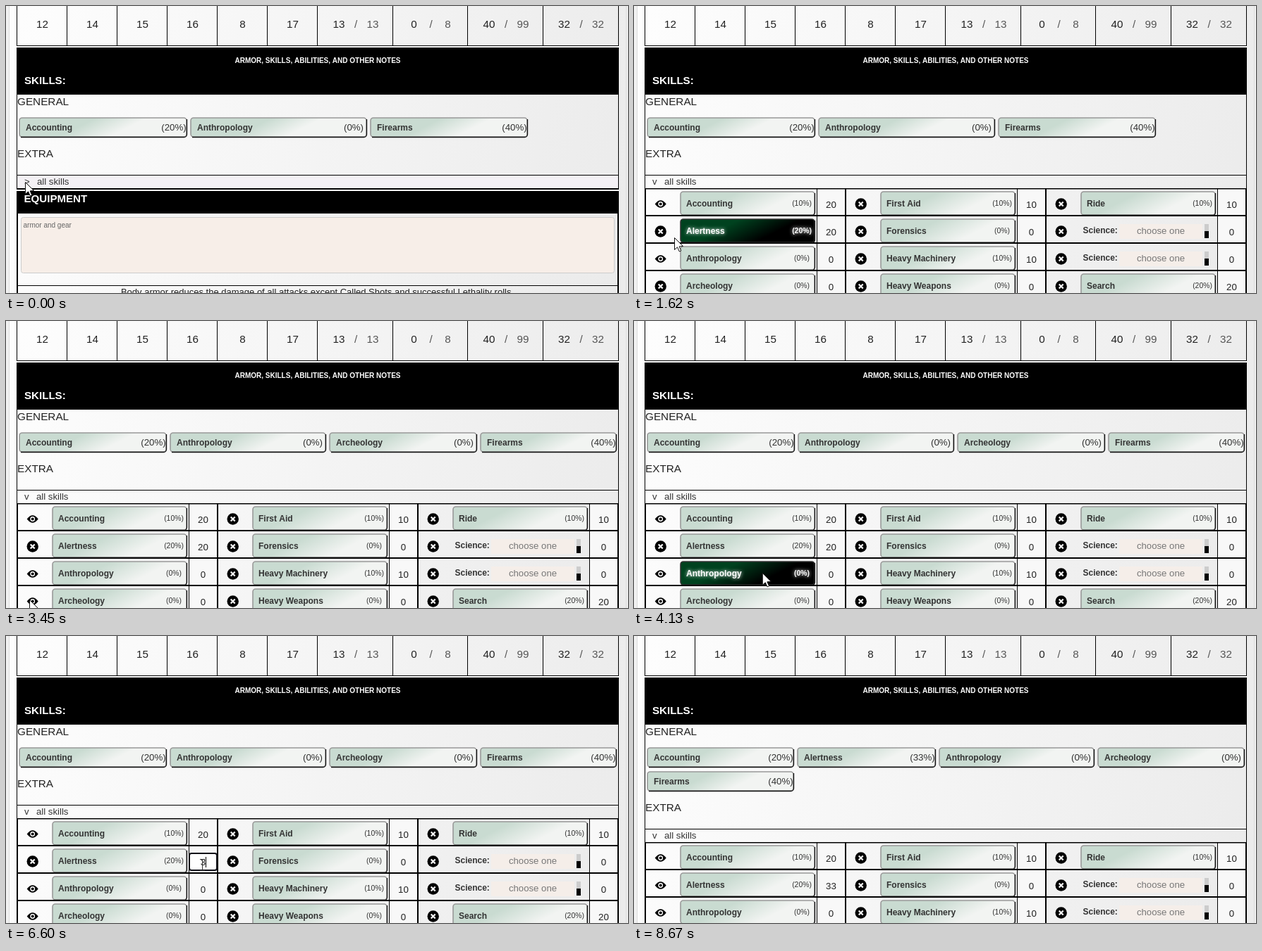
An HTML page with a canvas that plays this animation: 882x408 px, repeating every 9670 ms.

```html
<!DOCTYPE html>
<html lang="en">
<head>
<meta charset="utf-8">
<title>Skill sheet</title>
<style>
html, body { margin: 0; width: 100%; height: 100%; overflow: hidden; background: #f4f4f4; }
canvas { display: block; }
</style>
</head>
<body>
<canvas id="stage" width="882" height="408"></canvas>
<script>
const ctx = document.getElementById('stage').getContext('2d');
const W = 882, H = 408, LOOP = 9670, TICK = 200 / 3;
const FONT = '"Liberation Sans", Arial, sans-serif';

// name, base percent, current score; a null name is a "Science" chooser
const COLUMNS = [
  [['Accounting', 10, 20], ['Alertness', 20, 20], ['Anthropology', 0, 0], ['Archeology', 0, 0]],
  [['First Aid', 10, 10], ['Forensics', 0, 0], ['Heavy Machinery', 10, 10], ['Heavy Weapons', 0, 0]],
  [['Ride', 10, 10], [null, 0, 0], [null, 0, 0], ['Search', 20, 20]]
];

// name, percent, left, right, line
const PINNED = [
  [['Accounting', 20, 18, 257, 0], ['Anthropology', 0, 261, 512, 0], ['Firearms', 40, 516, 740, 0]],
  [['Accounting', 20, 18, 228, 0], ['Anthropology', 0, 232, 454, 0],
   ['Archeology', 0, 458, 668, 0], ['Firearms', 40, 672, 866, 0]],
  [['Accounting', 20, 18, 227, 0], ['Alertness', 33, 231, 428, 0], ['Anthropology', 0, 432, 653, 0],
   ['Archeology', 0, 657, 866, 0], ['Firearms', 40, 18, 227, 1]]
];

// time, x, y
const PATH = [
  [0, 27, 250], [1000, 27, 250], [1200, 46, 283], [1400, 78, 318], [1530, 70, 324],
  [1600, 57, 329], [1800, 41, 355], [1960, 33, 377], [2370, 33, 396], [3660, 33, 396],
  [3930, 110, 375], [4130, 215, 350], [4330, 278, 325], [8515, 278, 325], [8520, 553, 397]
];
// start, end, x, y
const CLICKS = [
  [270, 400, 27, 251], [2720, 2850, 33, 397], [4930, 5000, 276, 324], [5070, 5200, 276, 324]
];

const within = (t, a, b) => t >= a && t < b;

function rect(x, y, w, h, color = '#000') {
  ctx.fillStyle = color;
  ctx.fillRect(x, y, w, h);
}

function text(s, x, y, size, color = '#222', align = 'left', weight = 'normal') {
  ctx.font = `${weight} ${size}px ${FONT}`;
  ctx.fillStyle = color;
  ctx.textAlign = align;
  ctx.fillText(s, x, y);
}

function fade(x0, y0, x1, y1, from, to) {
  const g = ctx.createLinearGradient(x0, y0, x1, y1);
  g.addColorStop(0, from);
  g.addColorStop(1, to);
  return g;
}

function roundBox(x, y, w, h, r, fill, stroke, line = 1) {
  ctx.beginPath();
  ctx.roundRect(x, y, w, h, r);
  ctx.fillStyle = fill;
  ctx.fill();
  ctx.lineWidth = line;
  ctx.strokeStyle = stroke;
  ctx.stroke();
}

function pill(x, y, w, h, lit) {
  const tilt = h * 0.25;
  const fill = lit ? fade(x + w / 2 - tilt, y, x + w / 2 + tilt, y + h, '#00421f', '#000')
                   : fade(x + w / 2 - tilt, y, x + w / 2 + tilt, y + h, '#c9dbd1', '#f2f4f2');
  roundBox(x + 1, y + 1, w - 2, h - 2, 4, fill, lit ? '#333' : '#999', 1.6);
  ctx.beginPath();
  ctx.moveTo(x + 3, y + h - 0.5);
  ctx.lineTo(x + w - 4, y + h - 0.5);
  ctx.arcTo(x + w - 0.5, y + h - 0.5, x + w - 0.5, y + h - 4, 4);
  ctx.lineTo(x + w - 0.5, y + 3);
  ctx.strokeStyle = '#111';
  ctx.lineWidth = 1.3;
  ctx.stroke();
}

function background() {
  rect(0, 0, W, H, fade(0, 100, W, 320, '#fdfdfd', '#ebebeb'));
  rect(0, 0, 4, H, '#f1f1f1');
  rect(4, 0, 1, H, '#dcdcdc');
  rect(879, 0, 1, H, '#dcdcdc');
  rect(880, 0, 2, H, '#f1f1f1');
}

function statRow() {
  for (const x of [15, 86, 157, 228, 299, 370, 441, 548, 654, 761, 868]) rect(x, 0, 1, 57);
  rect(15, 56, 854, 1);
  [12, 14, 15, 16, 8, 17].forEach((n, i) => text(n, 51.5 + i * 71, 31, 15.2, '#222', 'center'));
  [[13, 13, 496], [0, 8, 602.5], [40, 99, 709], [32, 32, 815.5]].forEach(([now, max, x]) => {
    text(now, x - 24, 31, 15.2, '#222', 'center');
    text('/', x, 31, 15.2, '#555', 'center');
    text(max, x + 24, 31, 15.2, '#555', 'center');
  });
}

function skillsHead(pinned, shift) {
  rect(15, 57, 854, 2, '#fff');
  rect(15, 59, 854, 67);
  text('ARMOR, SKILLS, ABILITIES, AND OTHER NOTES', 442, 81, 10, '#fff', 'center', 'bold');
  text('SKILLS:', 26, 111, 15.1, '#fff', 'left', 'bold');
  rect(15, 126, 1, 134 + shift);
  rect(868, 126, 1, 134 + shift);
  text('GENERAL', 16, 141, 15.3);
  for (const [name, pct, left, right, line] of pinned) {
    const y = 158 + line * 34;
    pill(left, y, right - left, 29);
    text(name, left + 10, y + 19, 12, '#333', 'left', 'bold');
    text(`(${pct}%)`, right - 19, y + 19, 13.3, '#333', 'center');
  }
  text('EXTRA', 16, 215 + shift, 15.3);
  rect(15, 240 + shift, 854, 1);
}

function equipment() {
  rect(16, 241, 852, 18, '#f4f1f5');
  text('>', 26, 254, 13.2, '#333');
  text('all skills', 44, 254, 13.2, '#333');
  rect(15, 259, 854, 2);
  rect(15, 261, 854, 2, '#fff');
  rect(15, 263, 854, 32);
  text('EQUIPMENT', 25.5, 279, 15.1, '#fff', 'left', 'bold');
  rect(15, 295, 2, 113);
  rect(867, 295, 2, 113);
  roundBox(21.5, 300.5, 841, 79, 3, '#f7eee8', '#ccc');
  text('armor and gear', 24.5, 315, 10, '#666');
  rect(17, 397, 850, 1);
  text('Body armor reduces the damage of all attacks except Called Shots and successful Lethality rolls.',
    441.5, 411, 13, '#222', 'center');
}

function eye(x, y) {
  ctx.fillStyle = '#000';
  ctx.beginPath();
  ctx.moveTo(x - 8, y);
  ctx.quadraticCurveTo(x, y - 10.5, x + 8, y);
  ctx.quadraticCurveTo(x, y + 10.5, x - 8, y);
  ctx.fill();
  dot(x, y, 3.4, '#fff');
  dot(x, y, 2, '#000');
}

function dot(x, y, r, color) {
  ctx.beginPath();
  ctx.arc(x, y, r, 0, 7);
  ctx.fillStyle = color;
  ctx.fill();
}

function cross(x, y) {
  dot(x, y, 8.2, '#000');
  ctx.beginPath();
  ctx.moveTo(x - 3, y - 3); ctx.lineTo(x + 3, y + 3);
  ctx.moveTo(x + 3, y - 3); ctx.lineTo(x - 3, y + 3);
  ctx.strokeStyle = '#fff';
  ctx.lineWidth = 2.2;
  ctx.stroke();
}

function skillCell(x, y, [name, pct], lit) {
  if (!name) {
    text('Science:', x + 52.5, y + 21, 12, '#333', 'left', 'bold');
    rect(x + 104, y + 8, 118, 21, '#f5eee9');
    text('choose one', x + 163, y + 22, 13.2, '#777', 'center');
    rect(x + 225, y + 8, 6, 10, '#ccc');
    rect(x + 225, y + 18, 6, 10);
    return;
  }
  pill(x + 49, y, 192, 35, lit);
  const color = lit ? '#fff' : '#333';
  if (lit) {
    ctx.shadowColor = '#fff';
    ctx.shadowBlur = 5;
  }
  text(name, x + 58, y + 22, 12, color, 'left', 'bold');
  text(`(${pct}%)`, x + 222, y + 21, 10.4, color, 'center', lit ? 'bold' : 'normal');
  ctx.shadowBlur = 0;
}

function editedScore(t) {
  if (t < 5530) return '20';
  if (t < 6600) return '';
  return t < 6730 ? '3' : '33';
}

function scoreEditor(t) {
  const value = editedScore(t);
  const half = value.length * 3.7;
  roundBox(260, 309, 39, 24, 3, '#fff', '#101018', 2);
  const selected = within(t, 5270, 5530);
  if (selected) rect(272, 313, 15, 16, '#3390ff');
  text(value, 279.5, 326, 13.3, selected ? '#fff' : '#222', 'center');
  if (!selected && !within(t, 7330, 7730)) rect(Math.floor(279.5 + half), 314, 1, 15);
}

function table(t, shift) {
  text('v', 26, 254 + shift, 13.2, '#333');
  text('all skills', 43, 254 + shift, 13.2, '#333');
  const hover = within(t, 1340, 1670) ? 1 : within(t, 3800, 3930) ? 3 : within(t, 3930, 4200) ? 2 : -1;
  const shown = [true, t >= 8200, true, t >= 3180];
  COLUMNS.forEach((skills, c) => {
    const x = 16 + c * 284;
    skills.forEach((skill, r) => {
      const y = 263 + r * 39 + shift;
      rect(x + 244, y - 3, 40, 37, '#f8f8f8');
      rect(x, y + 34, 284, 2);
      (c === 0 && shown[r] ? eye : cross)(x + 21.7, y + 18.5);
      skillCell(x, y, skill, c === 0 && r === hover);
      const score = c === 0 && r === 1 ? editedScore(t) : skill[2];
      text(score, x + 263.5, y + 24, 13.3, '#222', 'center');
    });
    const top = 259 + shift;
    rect(x - 1, top, 2, H - top);
    rect(x + 243, top, 1, H - top);
  });
  rect(15, 259 + shift, 854, 1.5);
  rect(867, 259 + shift, 2, H);
  if (within(t, 5000, 7930)) {
    rect(260, 300, 39, 36, '#f8f8f8');
    scoreEditor(t);
  }
}

function pointAt(t) {
  const i = PATH.findIndex(p => p[0] > t);
  if (i < 0) return PATH[PATH.length - 1].slice(1);
  const [t0, x0, y0] = PATH[i - 1], [t1, x1, y1] = PATH[i];
  const k = (t - t0) / (t1 - t0);
  return [x0 + (x1 - x0) * k, y0 + (y1 - y0) * k];
}

function arrow(x, y) {
  ctx.beginPath();
  [[0, 0], [0, 17], [4, 13.3], [6.8, 19.5], [9.3, 18.4], [6.6, 12.4], [12, 12]]
    .forEach(([dx, dy]) => ctx.lineTo(x + 0.5 + dx, y + 0.5 + dy));
  ctx.closePath();
  ctx.fillStyle = '#fff';
  ctx.fill();
  ctx.strokeStyle = '#111';
  ctx.lineWidth = 1;
  ctx.stroke();
}

function beam(x, y) {
  x = Math.round(x);
  y = Math.round(y);
  rect(x, y - 7, 1, 15, '#333');
  for (const dy of [-8, 8]) {
    rect(x - 3, y + dy, 3, 1, '#333');
    rect(x + 1, y + dy, 3, 1, '#333');
  }
}

function pointer(t) {
  for (const [from, to, x, y] of CLICKS) {
    if (!within(t, from, to)) continue;
    ctx.globalCompositeOperation = 'multiply';
    dot(x, y, 12, '#fcf04a');
    ctx.globalCompositeOperation = 'source-over';
  }
  if (t >= 8670) return;
  const held = t >= 8520 ? t : Math.floor(t / TICK + 0.001) * TICK;
  const [x, y] = pointAt(held);
  (x > 258 ? beam : arrow)(x, y);
}

function draw(t) {
  const stage = t < 3450 ? 0 : t < 8200 ? 1 : 2;
  const shift = stage === 2 ? 34 : 0;
  background();
  statRow();
  skillsHead(PINNED[stage], shift);
  if (t < 740) equipment();
  else table(t, shift);
  pointer(t);
}

const start = performance.now();
function tick() {
  draw((performance.now() - start) % LOOP);
  requestAnimationFrame(tick);
}
tick();
</script>
</body>
</html>
```
